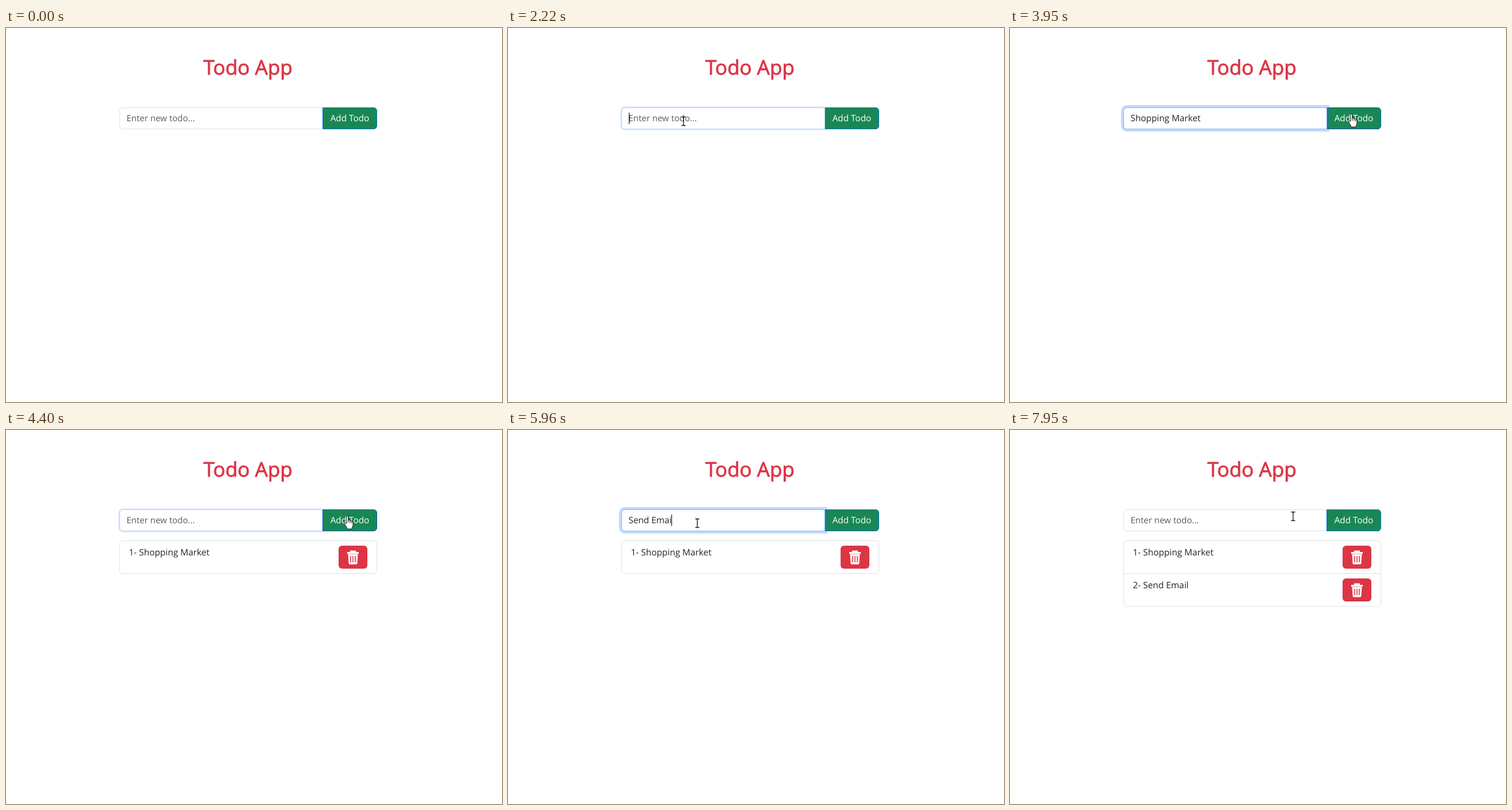
Write an HTML page that moves like this. It is 862 px wide and 650 px high and loops after 8000 ms.

```html
<!DOCTYPE html>
<html lang="en">
<head>
<meta charset="utf-8">
<title>Todo App</title>
<style>
  html, body { margin: 0; width: 100%; height: 100%; overflow: hidden; background: #fff; }
  * { box-sizing: border-box; }
  body {
    position: relative;
    font: 15px/24px "Open Sans", "Noto Sans", sans-serif;
    color: #212529;
    text-rendering: geometricPrecision;
  }
  h1, .field, .add, ul { position: absolute; margin: 0; }
  h1 {
    left: 197px; top: 48px; width: 447px;
    font-size: 35px; line-height: 41px; font-weight: 400;
    text-align: center; color: #dc3545; -webkit-text-stroke: .9px #dc3545;
  }
  .field {
    --focus: 0;
    left: 197px; top: 138px; width: 354px; height: 38px; padding: 6px 11.5px;
    background: #fff; white-space: pre;
    border: 1px solid color-mix(in srgb, #86b7fe calc(var(--focus) * 100%), #dee2e6);
    border-radius: 6px 0 0 6px;
    box-shadow: 0 0 0 calc(var(--focus) * 4px) rgba(13, 110, 253, calc(var(--focus) * .25));
  }
  .field.active { z-index: 3; }
  .typed { font-size: 15.3px; }
  .hint { position: absolute; left: 11.5px; color: rgba(33, 37, 41, .75); }
  .caret { position: absolute; top: 8px; width: 1px; height: 20px; background: #000; }
  .add {
    left: 550px; top: 138px; width: 95px; height: 38px; z-index: 2;
    padding: 6px 0; text-align: center; font-size: 15.3px; color: #fff; background: #198754;
    border: 1px solid #0f72d2; border-radius: 0 6px 6px 0;
  }
  .add.hover { border-color: #0a58ca; }
  ul {
    left: 197px; top: 192px; width: 448px; padding: 0; list-style: none;
    border: 1px solid #dee2e6; border-radius: 6px; font-size: 15.4px;
  }
  li { position: relative; height: 56px; padding: 8px 15.5px; }
  li + li { height: 57px; border-top: 1px solid #dee2e6; }
  .trash {
    position: absolute; right: 16px; top: 8px; width: 50px; height: 40px;
    background: #dc3545; border-radius: 6px;
  }
  .pointer { position: absolute; left: 0; top: 0; width: 100%; height: 100%; z-index: 9; }
  [hidden] { display: none !important; }
</style>
</head>
<body>
<svg width="0" height="0" style="position:absolute">
  <symbol id="bin" viewBox="0 0 50 40">
    <path fill="#fff" d="M20 8.500h10v2.500h5v3.500H15V11h5zM16.500 15h17l-1 15.500q-.2 2-2.200 2H19.700q-2 0-2.200-2z"/>
    <path stroke="#dc3545" stroke-width="1.600" stroke-linecap="round" d="M21 18.500v10M25 18.500v10M29 18.500v10"/>
  </symbol>
</svg>

<h1>Todo App</h1>
<div class="field"><span class="hint">Enter new todo...</span><span class="typed"></span><i class="caret"></i></div>
<div class="add">Add Todo</div>
<ul>
  <li>1- Shopping Market<svg class="trash"><use href="#bin"/></svg></li>
  <li>2- Send Email<svg class="trash"><use href="#bin"/></svg></li>
</ul>

<svg class="pointer">
  <g id="pointer">
    <path id="arrow" fill="#fff" stroke="#222" d="M.5.5V16l3.600-3.300 2.300 5.600 2.500-1-2.300-5.500h4.700z"/>
    <path id="beam" fill="none" stroke="#111" stroke-width="1.300" d="M-3.500-7.500h2.500l1 1 1-1h2.500M-3.500 7.500h2.500l1-1 1 1h2.500M0-6.500v13"/>
    <g id="hand">
      <path fill="#fff" stroke="#111" d="M-1.500.8C-1.500-.9 1.700-.9 1.700.8V7C3 6 4.600 6.600 4.900 8 6.300 7 7.600 8 7.800 9c1.400-.7 2.300.3 2.300 2v4c0 3-1.900 4-1.900 7H0c0-2.500-4.500-7-4.500-9.500C-4.300 10.500-2.500 10.700-1.500 13z"/>
      <path fill="none" stroke="#111" d="M1.700 6.500v4.500M4.900 8v3.500M7.800 9v3"/>
    </g>
  </g>
</svg>

<script>
const LOOP = 8000, TICK = 100, MOVE = 800, FADE = 200, KEY = 45, BLINK = 250;
const find = s => document.querySelector(s);
const field = find('.field'), typed = find('.typed'), hint = find('.hint');
const caret = find('.caret'), add = find('.add'), list = find('ul');
const items = document.querySelectorAll('li');
const pointer = find('#pointer');
const shapes = ['arrow', 'beam', 'hand'].map(id => find('#' + id));

// Each move bends towards one control point and starts where the last one ended
const origin = [137, 598];
const moves = [
  { at: 20, bend: [650, 200], to: [488, 150] },
  { at: 920, bend: [95, 95], to: [305, 162] },
  { at: 2950, bend: [501, 306], to: [593, 150] },
  { at: 4600, bend: [460, 170], to: [329, 162] },
  { at: 6020, bend: [500, 215], to: [605, 154] },
  { at: 7150, bend: [412, 148], to: [492, 150] }
];

const entries = [
  { text: 'Shopping Market', focus: 1920, type: 2320, click: 4300 },
  { text: 'Send Email', focus: 5040, type: 5590, click: 7020 }
];
const doneAt = e => e.click + FADE / 2;

const clamp = v => Math.min(1, Math.max(0, v));
const within = (v, a, b) => v >= a && v < b;
const ramp = (t, from) => clamp((t - from) / FADE);

function pointerAt(t) {
  const i = moves.findLastIndex(m => m.at <= t);
  const { at, bend, to } = moves[i];
  const from = i ? moves[i - 1].to : origin;
  const k = clamp(Math.floor((t - at) / TICK) * TICK / MOVE);
  const u = 1 - (1 - k) ** 1.5, v = 1 - u;
  return from.map((p, axis) => Math.round(v * v * p + 2 * u * v * bend[axis] + u * u * to[axis]));
}

function drawPointer(t) {
  const shown = t >= moves[0].at;
  pointer.style.display = shown ? '' : 'none';
  if (!shown) return add.classList.remove('hover');
  const [x, y] = pointerAt(t);
  const inRow = within(y, 138, 176);
  const over = inRow && within(x, 550, 645);
  const kind = over ? 2 : inRow && within(x, 197, 550) ? 1 : 0;
  shapes.forEach((s, i) => s.style.display = i === kind ? '' : 'none');
  pointer.setAttribute('transform', `translate(${x} ${y})`);
  add.classList.toggle('hover', over);
}

function caretOn(t, entry) {
  const idle = t - entry.type - entry.text.length * KEY;
  return idle < 0 || Math.floor(idle / BLINK) % 2 === 0;
}

function drawField(t) {
  const entry = entries.find(e => within(t, e.focus, doneAt(e)));
  const active = !!entry && t < entry.click;
  const count = entry ? Math.max(0, Math.floor((t - entry.type) / KEY) + 1) : 0;
  const text = entry ? entry.text.slice(0, count) : '';
  const ring = entries.reduce((sum, e) => sum + ramp(t, e.focus + FADE) - ramp(t, e.click), 0);
  typed.textContent = text;
  hint.hidden = text !== '';
  caret.hidden = !active || !caretOn(t, entry);
  field.classList.toggle('active', active);
  field.style.setProperty('--focus', ring);
}

function drawList(t) {
  entries.forEach((e, i) => items[i].hidden = t < doneAt(e));
  list.hidden = t < doneAt(entries[0]);
}

const begin = performance.now();
function draw() {
  const t = (performance.now() - begin) % LOOP;
  drawField(t);
  drawList(t);
  drawPointer(t);
  requestAnimationFrame(draw);
}
draw();
</script>
</body>
</html>
```
